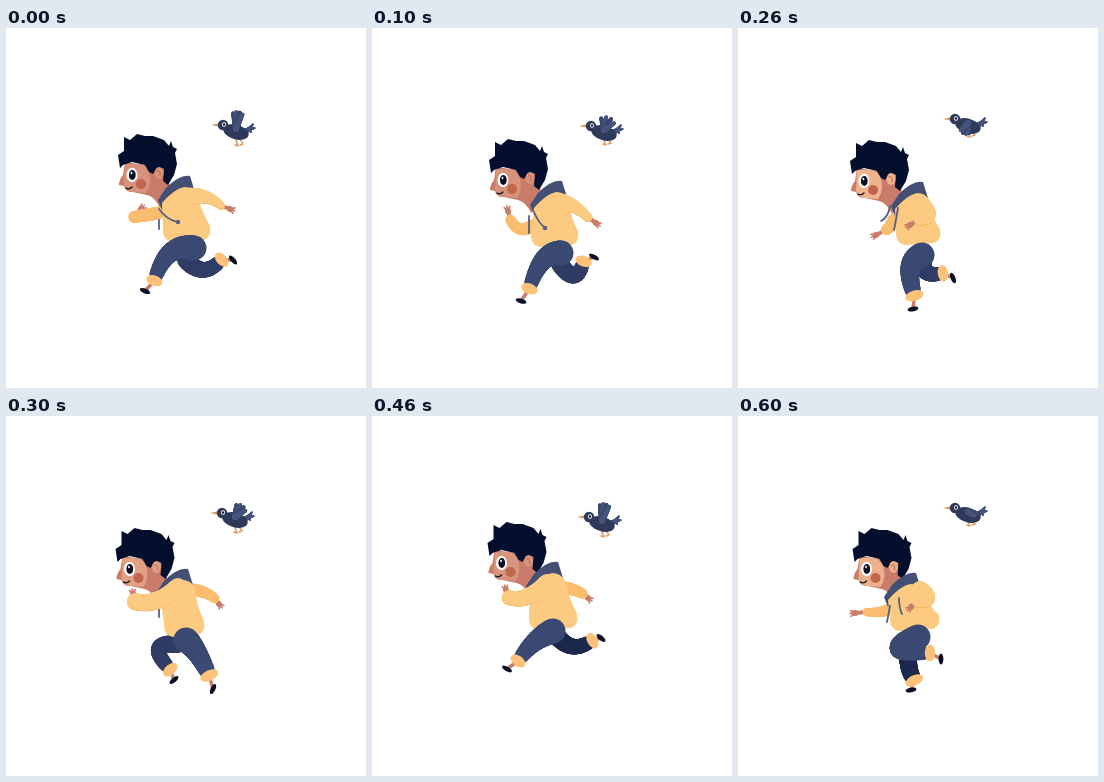
An HTML page with a canvas for the animation above (700 ms loop, 360 by 360 pixels).

```html
<!DOCTYPE html>
<html lang="en">
<head>
<meta charset="utf-8">
<title>Running boy and bird</title>
<style>
html, body { margin: 0; width: 100%; height: 100%; overflow: hidden; background: #fff; }
canvas { display: block; }
</style>
</head>
<body>
<canvas id="stage" width="360" height="360"></canvas>
<script>
const ctx = document.getElementById('stage').getContext('2d');
const STEP = 100, POSES = 7;
const C = {
  hair: '#040f2e', skin: '#c97c6a', blush: '#c0664f', ink: '#0a0f24',
  hoodie: '#fcca80', fold: '#edb468', cuff: '#fcc27a', farSleeve: '#fabd70',
  hood: '#434f73', cord: '#566080', jeans: '#3b4a72',
  bird: '#2f3a5a', feather: '#47557c', beak: '#dd9a5c'
};

// One row per pose. Limbs: start, control, end, end radius.
const headAt = [[0, 0], [5, 5], [0, 6], [-2.5, 6], [3.5, 0], [2.5, 5], [2.5, 6]];
const faceTone = ['#d8917a', '#d8917a', '#eeb48d', '#dfa083', '#d8947c', '#eeb68f', '#ecb08a'];
// Neck x, neck y, left, right, hem
const torsoAt = [
  [178, 160, 157, 204, 212], [184, 165, 159, 206, 217], [179, 166, 158, 202, 215],
  [176, 165, 158, 198, 219], [180, 158, 157, 205, 212], [176, 167, 157, 202, 211],
  [172, 169, 152, 201, 213]
];
const nearLeg = [
  [188, 220, 162, 214, 150, 248, 7], [189, 225, 170, 223, 159, 256, 7],
  [184, 227, 166, 234, 175, 263, 8], [180, 224, 190, 232, 201, 255, 8],
  [181, 215, 163, 222, 149, 241, 7], [180, 219, 162, 226, 152, 250, 7],
  [180, 221, 140, 237, 187, 237, 7]
];
const farLeg = [
  [180, 232, 196, 250, 212, 235, 7], [188, 236, 203, 258, 210, 238, 7],
  [185, 235, 185, 248, 200, 246, 7], [172, 228, 140, 226, 161, 250, 7],
  [185, 220, 198, 237, 216, 227, 7], [180, 224, 198, 246, 208, 231, 7],
  [170, 240, 170, 252, 174, 260, 8]
];
const nearArm = [
  [181, 169, 200, 164, 216, 178, 3.5], [186, 174, 200, 173, 217, 190, 4],
  [182, 176, 200, 190, 180, 192, 5], [172, 171, 150, 191, 128, 185, 8],
  [175, 167, 155, 187, 136, 181, 7], [175, 180, 168, 201, 147, 199, 8],
  [182, 174, 198, 185, 179, 185, 6]
];
const farArm = [
  [152, 185, 135, 188, 128, 189, 6], [160, 198, 146, 207, 138, 191, 5],
  [156, 192, 152, 200, 148, 202, 5], [188, 174, 202, 176, 209, 183, 4.5],
  [192, 172, 203, 173, 211, 178, 5], [190, 172, 198, 176, 203, 182, 5],
  [158, 190, 145, 198, 128, 196, 4]
];
// Shoe x, y, angle
const nearShoe = [[139, 263, .4], [149, 273, .3], [175, 281, -.2], [207, 273, 2], [135, 253, .5], [144, 266, .25], [203, 243, 1.55]];
const farShoe = [[227, 232, .85], [222, 229, .5], [215, 250, 1.2], [168, 264, -.7], [229, 222, .7], [220, 223, .5], [173, 274, -.2]];
const nearHand = [[224, 181], [224, 195], [172, 197], [127, 178], [134, 174], [141, 190], [173, 191]];
const farHand = [[135, 181], [136, 183], [138, 207], [213, 188], [216, 182], [207, 188], [117, 197]];
const cords = [
  'M153 181Q160 191 171 194M153 192v9', 'M162 184Q166 194 173 200M157 188v17',
  'M160 180Q158 192 156 202M152 178Q150 190 143 193', 'M153 192v9', '',
  'M148 175L155 185', 'M161 182Q161 192 164 198M152 190L149 206'
];
// Bird head x, y, wing angle, wing length, feather spread, foot drop
const birdAt = [
  [217, 97, -1.45, 18, .2, 21], [219, 98, -1.2, 14, .4, 19], [217, 91, 1.9, 12, .3, 18],
  [216, 97, -1, 14, .3, 20], [217, 101, -1.4, 18, .2, 20], [217, 97, -.95, 11, .4, 18],
  [217, 92, .3, 9, .15, 18]
];

function fill(path, color) {
  ctx.fillStyle = color;
  ctx.fill(new Path2D(path));
}

function line(path, color, width) {
  ctx.strokeStyle = color;
  ctx.lineWidth = width;
  ctx.stroke(new Path2D(path));
}

function oval(x, y, rx, ry, color, angle = 0) {
  ctx.fillStyle = color;
  ctx.beginPath();
  ctx.ellipse(x, y, rx, ry, angle, 0, 7);
  ctx.fill();
}

// A tapered tube along a quadratic curve.
function limb([x0, y0, cx, cy, x1, y1, r1], r0, color) {
  for (let t = 0; t <= 1; t += 1 / 48) {
    const u = 1 - t, r = r0 * u + r1 * t;
    oval(u * u * x0 + 2 * u * t * cx + t * t * x1, u * u * y0 + 2 * u * t * cy + t * t * y1, r, r, color);
  }
}

function leg(row, [sx, sy, angle], r0, color) {
  const [, , cx, cy, x, y, r] = row, a = Math.atan2(y - cy, x - cx);
  const kx = x + 5 * Math.cos(a), ky = y + 5 * Math.sin(a);
  line(`M${kx} ${ky}L${sx} ${sy}`, C.skin, 3.5);
  oval(sx, sy, 5.5, 2.4, C.ink, angle);
  limb(row, r0, color);
  oval(kx, ky, 5.2, r + 1.5, C.cuff, a);
}

function arm(row, [hx, hy], r0, color) {
  const x = row[4], y = row[5], a = Math.atan2(hy - y, hx - x);
  line(`M${x} ${y}L${hx} ${hy}`, C.skin, 4);
  oval(hx, hy, 3.4, 3, C.skin, a);
  for (const d of [-.6, 0, .6])
    line(`M${hx} ${hy}l${5 * Math.cos(a + d)} ${5 * Math.sin(a + d)}`, C.skin, 1.7);
  limb(row, r0, color);
}

function head(x, y, tone) {
  ctx.save();
  ctx.translate(x, y);
  fill('M119 134L117 147Q113 152 113 157L118 158Q119 164 127 164L141 167Q149 169 154 180L166 168L160 140Z', C.skin);
  fill('M119 136L118 157Q119 163 127 164L140 165Q147 155 142 142L136 136Z', tone);
  oval(153, 145, 5, 6.5, C.skin);
  fill('M114 140L112 127L118 123L118 109L124 112L131 106L139 108L147 108L158 112L163 118L165 113L167 119L171 121L169 125L171 136L168 147L162 157L157 153L158 141Q152 137 147 146L143 144L139 137L126 134L117 137Z', C.hair);
  oval(153, 145, 4.4, 6, tone);
  line('M151 143q4 -2 3 5', C.blush, 1);
  oval(126, 147, 5.5, 7.2, '#fff');
  oval(126.3, 147, 3.4, 5, C.ink);
  oval(125.5, 145, .9, 1.2, '#fff');
  oval(135, 156, 5, 5, C.blush);
  line('M120 160q3 2 6 -1', C.ink, 1.3);
  ctx.restore();
}

function hood(x, y) {
  ctx.save();
  ctx.translate(x, y);
  fill('M-26 12L-18 0Q-4 -14 6 -12L11 4L12 12L-8 6L-22 22Z', C.hood);
  ctx.restore();
}

function torso(x, y, left, right, hem) {
  fill(`M${x - 22} ${y + 15}Q${x - 10} ${y + 1} ${x} ${y - 1}Q${x + 9} ${y - 1} ${x + 13} ${y + 7}
    Q${right - 8} ${y + 24} ${right} ${hem - 14}Q${right + 2} ${hem - 3} ${right - 6} ${hem}
    L${left + 9} ${hem + 2}Q${left - 1} ${hem} ${left} ${hem - 12}Z`, C.hoodie);
}

function bird(x, y, angle, length, spread, drop) {
  line(`M${x + 12} ${y + 12}L${x + 15} ${y + drop}l-3 -1M${x + 16} ${y + 12}L${x + 20} ${y + drop - 2}l-3 1`, C.beak, 1.5);
  fill(`M${x - 3} ${y - 2}l-9 2l9 2Z`, C.beak);
  for (const dy of [-1, 3, 7])
    limb([x + 20, y + 7, x + 27, y + 4, x + 33 - Math.abs(dy - 2), y + dy, .8], 2.5, C.feather);
  oval(x + 13, y + 7, 13, 7.3, C.bird, .28);
  oval(x, y, 5.2, 5.2, C.bird);
  const wx = x + 13, wy = y + 4;
  for (let i = 0; i < 4; i++) {
    const a = angle + (i - 1.5) * spread, l = length - Math.abs(i - 1.5);
    const dx = l * Math.cos(a), dy = l * Math.sin(a);
    limb([wx, wy, wx + dx / 2, wy + dy / 2, wx + dx, wy + dy, 1.8], 3, i % 2 ? C.feather : '#3b486d');
  }
  oval(x + 1, y - .5, 2, 2.2, '#fff');
  oval(x + 1, y - .5, 1.1, 1.3, C.ink);
}

function draw(now) {
  const i = Math.floor(now / STEP) % POSES;
  ctx.fillStyle = '#fff';
  ctx.fillRect(0, 0, 360, 360);
  ctx.lineCap = ctx.lineJoin = 'round';
  arm(farArm[i], farHand[i], 6.5, C.farSleeve);
  leg(farLeg[i], farShoe[i], 9, i > 3 ? '#1d294d' : '#303d65');
  head(...headAt[i], faceTone[i]);
  hood(...torsoAt[i]);
  torso(...torsoAt[i]);
  leg(nearLeg[i], nearShoe[i], 12.5, C.jeans);
  line(cords[i], C.cord, 1.8);
  if (i === 0) oval(172, 194, 2.2, 2.2, C.cord);
  if (i === 1) oval(173, 200, 2.2, 2.2, C.cord);
  ctx.save();
  ctx.translate(0, .8);
  limb(nearArm[i], 8.5, C.fold);
  ctx.restore();
  arm(nearArm[i], nearHand[i], 9, C.hoodie);
  bird(...birdAt[i]);
}

function tick() {
  draw(performance.now());
  requestAnimationFrame(tick);
}
tick();
</script>
</body>
</html>
```
